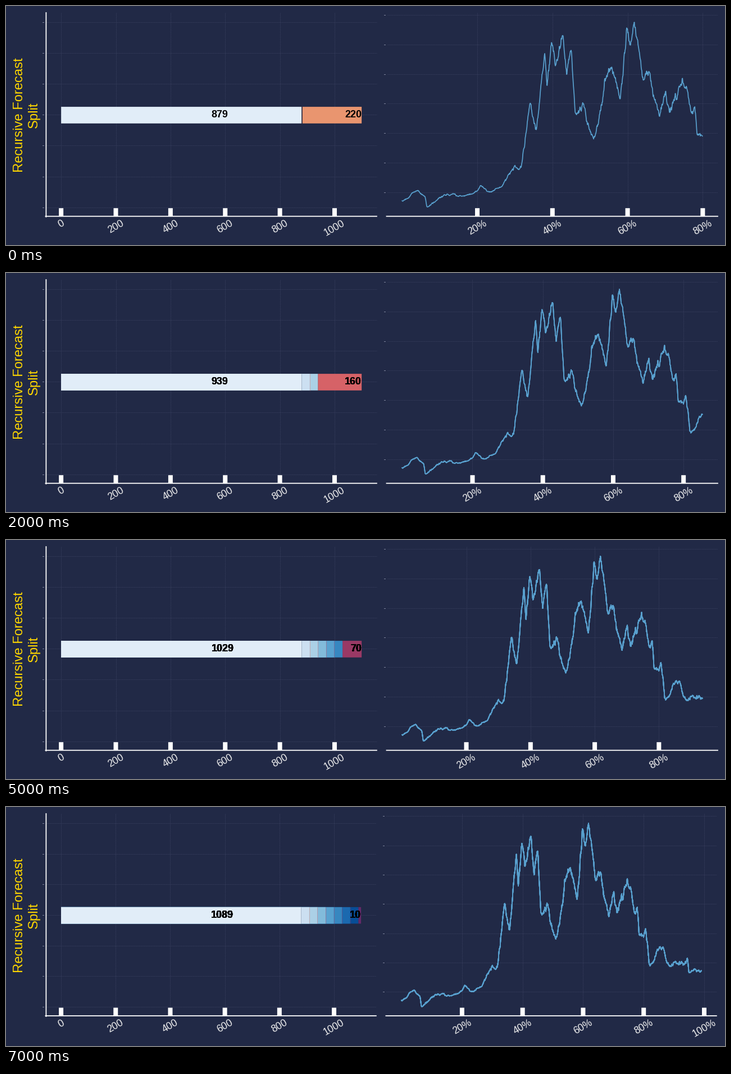
Animation of 1280 by 427 pixels, one loop 8 s. Source, as a matplotlib script:

```python
import numpy as np
import matplotlib.pyplot as plt
from matplotlib.animation import FuncAnimation
from matplotlib.colors import LinearSegmentedColormap
from matplotlib.patches import Rectangle

W, H, DPI = 1280, 427, 64
PT = 72 / DPI
TOTAL, FIRST, STEP, STEPS = 1099, 879, 30, 8
BG, GRID, INK, GOLD = "#212946", "#3a4160", "#eeeeee", "#ffd700"
TOP, FULL, LEFT, GAP = 12, 363.7, 71.4, 18.6

BLUES = plt.cm.Blues(np.arange(1, STEPS + 1) / (STEPS + 1))
FLARE = LinearSegmentedColormap.from_list(
    "flare", [(0, "#e9956f"), (3 / 7, "#cd4863"), (1, "#652968")]
)(np.linspace(0, 1, STEPS))

plt.rcParams["font.family"] = ["Liberation Sans", "DejaVu Sans"]


def make_series():
    """Price path: a seeded random walk pinned to its main turning points."""
    turns = [(705, 348), (731, 330), (746, 341), (749, 359), (780, 337),
             (828, 336), (846, 321), (856, 331), (883, 322), (906, 285),
             (917, 288), (933, 172), (944, 222), (959, 83), (963, 143),
             (971, 65), (978, 108), (991, 52), (998, 124), (1006, 77),
             (1013, 190), (1028, 174), (1035, 212), (1050, 227), (1066, 130),
             (1079, 112), (1093, 168), (1105, 38), (1111, 70), (1118, 29),
             (1135, 133), (1146, 119), (1163, 198), (1174, 151), (1181, 190),
             (1203, 136), (1226, 180), (1230, 230), (1245, 222), (1252, 282),
             (1285, 257), (1294, 281), (1329, 283), (1337, 272), (1340, 298),
             (1367, 295)]
    xs, ys = np.array(turns).T
    days = np.arange(TOTAL)
    x = 705 + 668.9 * days / TOTAL
    trend = np.interp(x, xs, ys)
    walk = np.cumsum(np.random.default_rng(11).normal(size=TOTAL))
    bridge = walk - np.interp(x, xs, np.interp(xs, x, walk))
    y = trend + bridge * np.clip((345 - trend) / 50, 0.6, 3)
    return days / TOTAL, np.clip(y, 29, 359)


FRAC, PRICE = make_series()

fig = plt.figure(figsize=(W / DPI, H / DPI), dpi=DPI, facecolor=BG)
ax = fig.add_axes([0, 0, 1, 1])


def line(x, y, color, width, **kw):
    ax.plot(x, y, color=color, lw=width * PT, **kw)


def box(x0, x1, y0, y1, color):
    ax.add_patch(Rectangle((x0, y0), x1 - x0, y1 - y0, fc=color, lw=0,
                           snap=False))


def text(x, y, s, size, color, **kw):
    ax.text(x, y, s, fontsize=size * PT, color=color, **kw)


def panel(left, width, bottom, rows, ticks):
    """Grid, small side marks, bottom axis and slanted tick labels."""
    dash = dict(ls=(0, (2.5, 1.2)), zorder=0)
    for y in rows:
        line([left, left + width], [y, y], GRID, 0.7, **dash)
        line([left - 6, left - 4], [y, y], "#7d839b", 1)
    for x, label in ticks:
        line([x, x], [TOP, bottom], GRID, 0.7, **dash)
        box(x - 4, x + 4, bottom - 14.5, bottom, "white")
        text(x, bottom + 4.2, label, 17.7, INK, rotation=30, ha="center",
             va="top")
    line([left - 1, left + width], [bottom, bottom], "white", 1.8, snap=False)


def layout(seen):
    """Panel width and height; both shrink once the 100% label has to fit."""
    if seen * 1.05 < 1:
        return (1267 - LEFT - GAP) / 2, FULL
    return (1243 - LEFT - GAP) / (1 + 1 / 22 + 1 / (1.1 * seen)), FULL - 2.6


def draw(i):
    ax.clear()
    ax.set(xlim=(0, W), ylim=(H, 0))
    ax.axis("off")
    n = FIRST + STEP * i
    seen = n / TOTAL
    width, height = layout(seen)
    right, bottom = LEFT + width + GAP, TOP + height

    def fy(y):
        return TOP + (y - TOP) * height / FULL

    def bx(v):
        return LEFT + width / 22 + v * width / (1.1 * TOTAL)

    # split bar
    panel(LEFT, width, bottom, fy(29 + 55.1 * np.arange(7)),
          [(bx(v), str(v)) for v in range(0, 1001, 200)])
    line([LEFT, LEFT], [TOP, bottom + 1], "white", 1.8, snap=False)
    y0, y1 = fy(180.1), fy(209.8)
    box(bx(n), bx(TOTAL), y0, y1, FLARE[i])
    for k in range(i, -1, -1):
        box(bx(0), bx(FIRST + STEP * k), y0, y1, BLUES[k])
    if i == 0:
        line([bx(n) + 1] * 2, [y0, y1], BG, 1.6, solid_capstyle="butt")
    for k in range(i):
        x = bx(FIRST + STEP * k)
        line([x, x], [y0, y1], FLARE[k] if k else "#6d7890", 0.9,
             alpha=0.45, solid_capstyle="butt")
    for _ in range(i + 1):
        text(bx(TOTAL / 2), fy(199.2), str(n), 17.9, "black", weight="bold")
        text(bx(TOTAL), fy(199.2), str(TOTAL - n), 17.9, "black",
             weight="bold", ha="right")
    for x, word in ((29.7, "Recursive Forecast"), (56.2, "Split")):
        text(x, fy(195), word, 23.7, GOLD, rotation=90, ha="center",
             va="baseline", rotation_mode="anchor")

    # price curve, rescaled to the days seen so far
    scale = width / 1.1 / seen
    start = right + width / 22
    ticks = [(start + p / 100 * scale, f"{p}%") for p in range(20, 101, 20)]
    panel(right, width, bottom, fy(16.3 + 52.7 * np.arange(7)),
          [t for t in ticks if t[0] < right + width])
    for _ in range(i + 1):
        line(start + FRAC[:n] * scale, fy(PRICE[:n]), "#59a1cf", 1.7)
    return []


anim = FuncAnimation(fig, draw, frames=STEPS, interval=1000, repeat=True,
                     repeat_delay=0, init_func=lambda: draw(0), blit=False)
plt.show()
```
